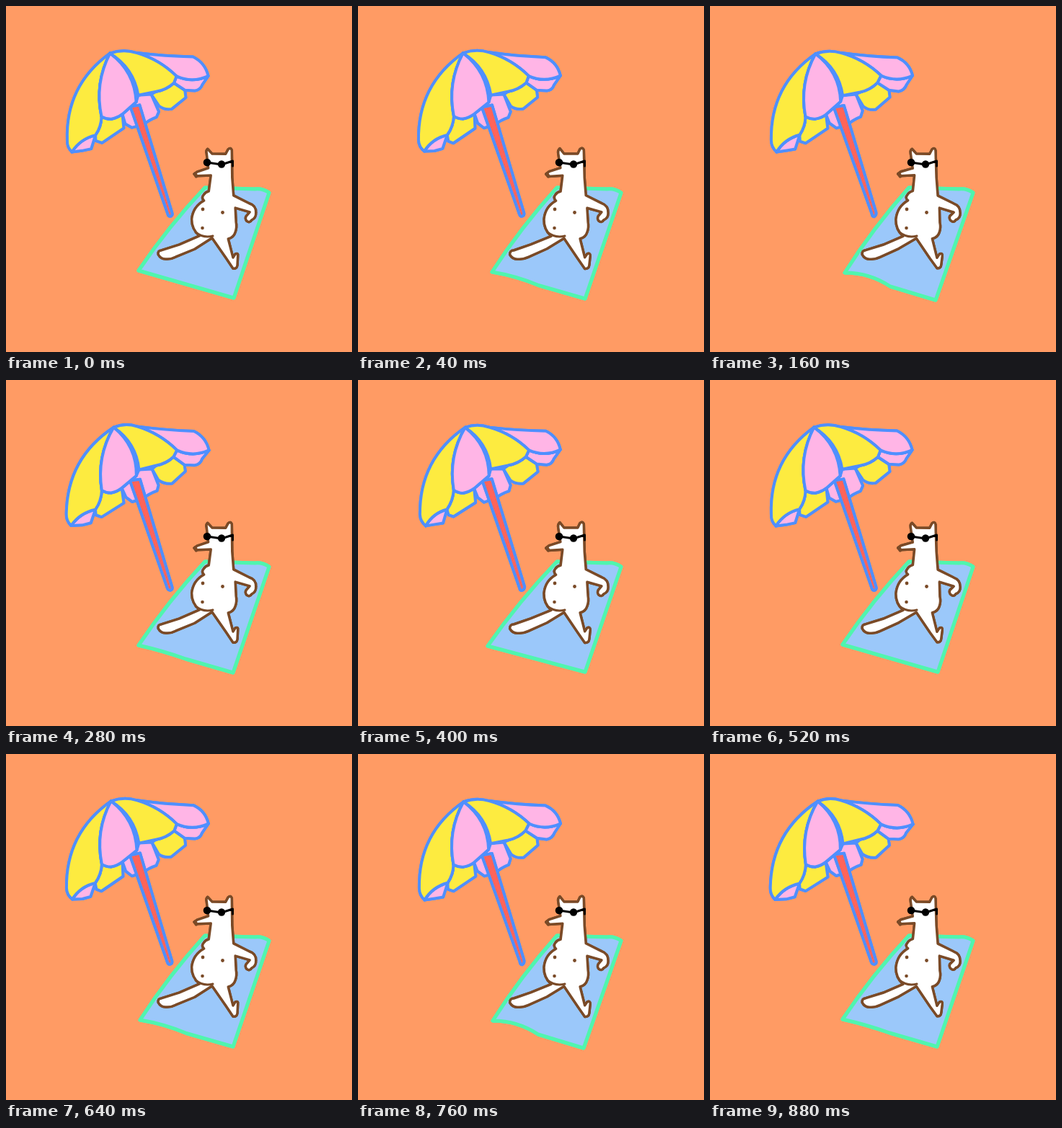
An HTML page with a canvas that plays this animation: 480x480 px, repeating every 1000 ms.

```html
<!DOCTYPE html>
<html lang="en">
<head>
<meta charset="utf-8">
<title>Sunbather</title>
<style>
html, body { margin: 0; width: 100%; height: 100%; overflow: hidden; background: #ff9b64; }
canvas { display: block; }
</style>
</head>
<body>
<canvas id="stage" width="480" height="480"></canvas>
<script>
const ctx = document.getElementById('stage').getContext('2d');
const SAND = '#ff9b64', PINK = '#ffb5e6', YELLOW = '#fdeb40', BLUE = '#4f8fff', RED = '#ff6459';
const BROWN = '#7a4a27', SKY = '#9bc8fa', MINT = '#50f5ae', BLACK = '#000';

// Where the seams of the parasol meet
const joints = {
  top: [147, 66], hem: [84, 186], tip: [91, 202], notch: [124, 179],
  midL: [133, 153], midB: [146, 157], midK: [161, 150], hub: [181, 133], fold: [184, 124],
  split: [182, 65], brow: [260, 71], edge: [281, 97], dip: [237, 97], lip: [233, 107], sag: [208, 119],
  pinkA: [272, 109], pinkB: [262, 118], pinkC: [248, 117],
  yelA: [249, 127], yelB: [230, 143], yelC: [212, 139], yelD: [202, 123],
  backA: [212, 146], backB: [209, 154], backC: [190, 165], backD: [175, 169], backE: [166, 163],
  leftA: [125, 187], leftB: [133, 190], leftC: [163, 170], endA: [106, 201], endB: [118, 198],
  poleA: [172, 140], poleB: [186, 138], poleC: [231, 287], poleD: [228, 292], poleE: [224, 289]
};

// Each panel runs from joint to joint; ":n" bows that edge n pixels to its left
const panels = [
  [PINK, 'midK backE backD backC backB:1 backA yelD fold hub'],
  [YELLOW, 'yelD yelC yelB:-2 yelA pinkC lip sag:2'],
  [PINK, 'edge pinkA pinkB:2 pinkC lip dip edge:-5'],
  [YELLOW, 'notch leftA leftB leftC midK midB midL notch:2'],
  [PINK, 'tip endA endB notch tip:-4'],
  [RED, 'poleA poleB poleC poleD:1 poleE:1'],
  [YELLOW, 'top hem:-18 tip:-2 notch:4 midL:-2 top:8'],
  [PINK, 'split brow:-1 edge:4 dip:5 split:-4'],
  [YELLOW, 'top split:3 dip:4 lip sag:2 fold top:-8'],
  [PINK, 'top hub:9 midK midB:1 midL:1 top:8']
];

// Five redrawings: sideways drift of the parasol, lower towel corners, towel crease
const poses = [
  { top: -2, tip: 1, left: [184, 367], foot: [316, 405], crease: 0 },
  { top: -1, tip: 1, left: [186, 369], foot: [315, 406], crease: 2 },
  { top: -1, tip: 1, left: [187, 370], foot: [313, 408], crease: 5 },
  { top: 2, tip: -1, left: [184, 368], foot: [315, 406], crease: 1 },
  { top: 1, tip: 3, left: [180, 369], foot: [315, 405], crease: 0 }
];

// Clockwise outline of the bather: x,y and an optional outward bow
const body = `281,225 278,204 280,198,1 286,205 305,205 308,199 313,200,2 314,238 316,263
  338,274 347,287,3 341,297,2 334,298,2 333,292,1 338,286 318,280 319,300 318,314,1
  308,323,2 315,349 318,344 322,347,2 321,359 315,364,2 305,350 286,322 262,337 236,348
  222,351,1 211,345,2 216,339,2 240,331 268,319 258,296,3 275,270,4 274,262,2 281,257,1
  284,235 264,236 261,233 265,230`.split(/\s+/).map(p => p.split(',').map(Number));

// Repeatable noise from -1 to 1
function noise(a, b) {
  const n = Math.sin(a * 127.1 + b * 311.7) * 43758.5453;
  return (n - Math.floor(n)) * 2 - 1;
}

const shaky = ([x, y, bow = 0], seed, i, amount) =>
  [x + noise(seed, i) * amount, y + noise(seed + 9, i) * amount, bow];

// Adds an arc from a to b; b[2] is its height
function arcTo(a, b) {
  const dx = b[0] - a[0], dy = b[1] - a[1];
  const k = 2 * (b[2] || 0) / (Math.hypot(dx, dy) || 1);
  ctx.quadraticCurveTo((a[0] + b[0]) / 2 + dy * k, (a[1] + b[1]) / 2 - dx * k, b[0], b[1]);
}

function line(pts, color, width) {
  ctx.beginPath();
  ctx.moveTo(pts[0][0], pts[0][1]);
  for (let i = 1; i < pts.length; i++) arcTo(pts[i - 1], pts[i]);
  ctx.strokeStyle = color;
  ctx.lineWidth = width;
  ctx.stroke();
}

function shape(pts, fill, color, width) {
  ctx.fillStyle = fill;
  line([...pts, pts[0]], color, width);
  ctx.fill();
  ctx.stroke();
}

function dot(x, y, r, color) {
  ctx.beginPath();
  ctx.arc(x, y, r, 0, 7);
  ctx.fillStyle = color;
  ctx.fill();
}

function drawTowel({ left, foot, crease }) {
  const middle = [(left[0] + foot[0]) / 2, (left[1] + foot[1]) / 2];
  shape([[...left, -crease], [276, 252, 3], [345, 254], [365, 259, 2], foot, middle], SKY, MINT, 5);
}

function drawParasol(pose, seed) {
  const at = {};
  Object.keys(joints).forEach((name, i) => at[name] = shaky(joints[name], seed, i, 0.7));
  at.top[0] += pose.top;
  at.tip[0] += pose.tip;
  at.hem[0] += pose.tip / 2;
  for (const [fill, route] of panels) {
    const pts = route.split(' ').map(stop => {
      const [name, bow = 0] = stop.split(':');
      return [at[name][0], at[name][1], +bow];
    });
    shape(pts, fill, BLUE, 4);
  }
}

function drawBather(seed) {
  shape(body.map((p, i) => shaky(p, seed, i, 0.4)), '#fff', BROWN, 3.5);
  line([[263, 314], [287, 319, -3]], BROWN, 3);
  line([[264, 236], [262, 233]], BROWN, 5);
  dot(273, 282, 2.4, BROWN);
  dot(300.5, 286.5, 2.4, BROWN);
  dot(272.5, 308, 2.3, BROWN);
  line([[279, 217], [299, 220], [314.5, 215], [314.5, 222]], BLACK, 3);
  dot(279, 217, 5.3, BLACK);
  dot(299, 219.5, 5.2, BLACK);
}

function draw(step) {
  const pose = poses[step % 5];
  ctx.fillStyle = SAND;
  ctx.fillRect(0, 0, 480, 480);
  ctx.lineCap = ctx.lineJoin = 'round';
  drawTowel(pose);
  drawParasol(pose, step % 5);
  drawBather(step % 3);
}

const start = performance.now();
let shown = -1;
function tick() {
  const t = (performance.now() - start) % 1000;
  const step = t < 40 ? 0 : 1 + Math.floor((t - 40) / 120);
  if (step !== shown) draw(shown = step);
  requestAnimationFrame(tick);
}
tick();
</script>
</body>
</html>
```
